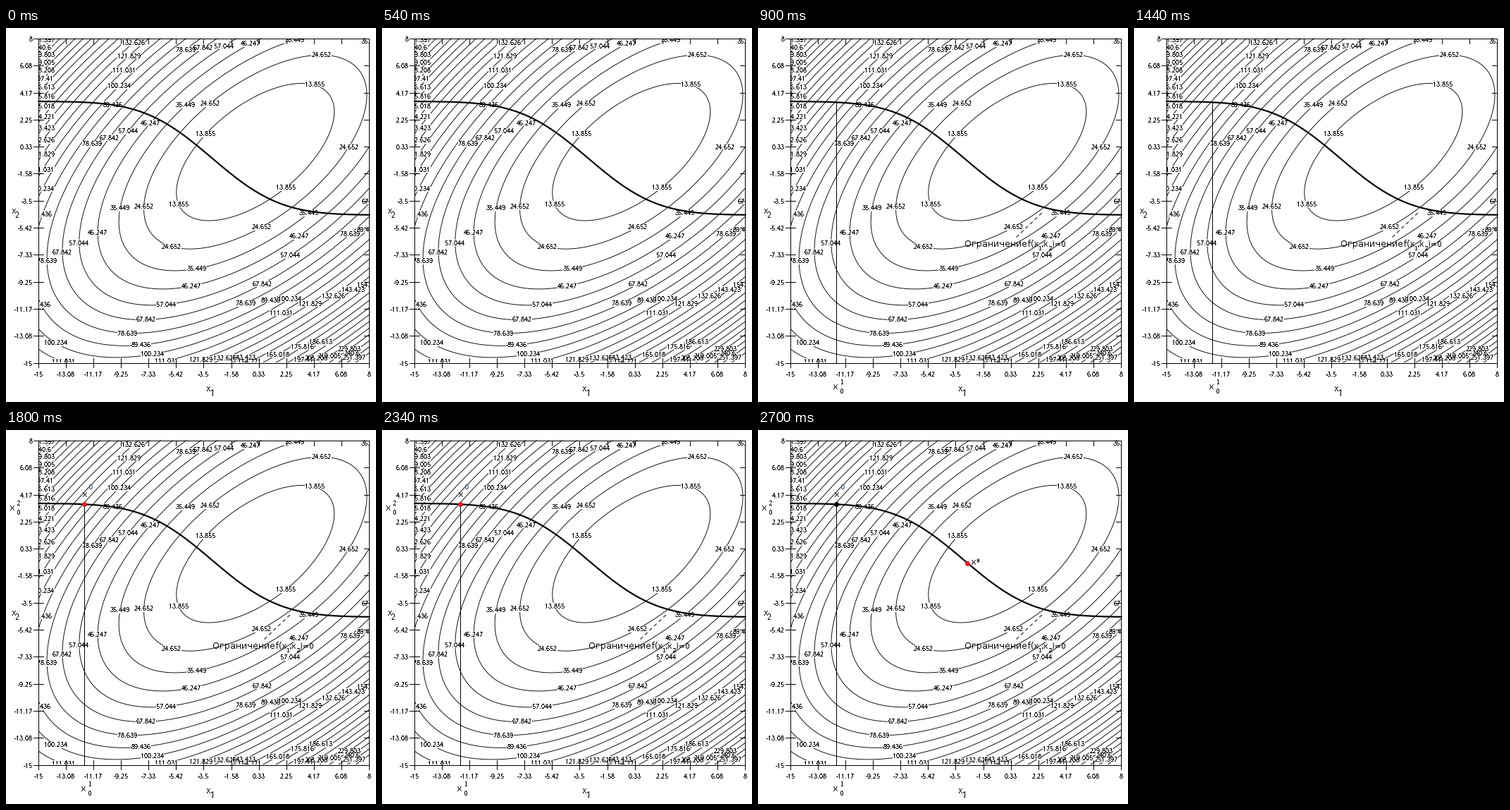
Recreate the animation shown at these times as a matplotlib script. Size 525x530 px, loop 3600 ms.

```python
import numpy as np
import matplotlib
import matplotlib.pyplot as plt
from matplotlib.animation import FuncAnimation
from matplotlib.patches import Rectangle

matplotlib.rcParams["text.hinting"] = "default"
matplotlib.rcParams["text.hinting_factor"] = 1

W, H, DPI = 525, 530, 100
PX = 72 / DPI
LEFT, RIGHT, TOP, BOTTOM = 46, 515, 14, 473.5
LOW, HIGH = -15, 8
X_SCALE = (RIGHT - LEFT) / (HIGH - LOW)
Y_SCALE = (BOTTOM - TOP) / (HIGH - LOW)
BASE, STEP, LEVELS = 3.0572, 10.7974, 24
RED = "#ed1c24"

# Contour labels sit where the levels cross these guide lines
GUIDES = [
    [(246, 249), (161, 255), (129, 290), (57, 330), (49, 395), (81, 472)],
    [(200, 279), (270, 341), (264, 364), (172, 432), (219, 472), (337, 466),
     (345, 473), (382, 463), (448, 443), (420, 470), (455, 466), (486, 454),
     (494, 466)],
    [(400, 221), (355, 284), (430, 259), (404, 321), (336, 390), (403, 382),
     (385, 405), (514, 363)],
    [(283, 150), (289, 106), (254, 109), (205, 134), (122, 164), (152, 106),
     (180, 20)],
    [(438, 79), (447, 37), (408, 16), (255, 30)],
    [(486, 168), (517, 17)],
    [(518, 245), (485, 292), (511, 285)],
    [(51, 263), (53, 16)],
]


def objective(px, py):
    """Quadratic bowl, evaluated at stage pixels."""
    u = LOW + (px - LEFT) / X_SCALE - 0.07
    v = HIGH - (py - TOP) / Y_SCALE + 0.07
    return 0.55 * u * u - 0.73 * u * v + 0.70 * v * v + 3


def constraint_y(px):
    """Smooth fall between two flat ends."""
    d = px - 292
    return 184 + 80.5 * np.tanh(0.0105 * d + 8.6e-8 * d**3)


def short(value, digits):
    return f"{value:.{digits}f}".rstrip("0").rstrip(".")


def crossings(guide):
    """Yield (level value, x, y) along a guide that climbs the bowl."""
    xs, ys = np.array(guide, float).T
    knots = np.arange(len(xs))
    t = np.linspace(0, knots[-1], 60 * len(xs))
    gx, gy = np.interp(t, knots, xs), np.interp(t, knots, ys)
    heights = np.maximum.accumulate(objective(gx, gy))
    first, last = np.rint((heights[[0, -1]] - BASE) / STEP).astype(int)
    for n in range(first, last + 1):
        value = BASE + n * STEP
        at = np.interp(value, heights, t)
        yield value, np.interp(at, knots, xs), np.interp(at, knots, ys)


fig = plt.figure(figsize=(W / DPI, H / DPI), dpi=DPI, facecolor="white")
ax = fig.add_axes([0, 0, 1, 1])
# Just under half a pixel, so whole numbers snap to their own pixel
ax.set_xlim(-0.49, W - 0.49)
ax.set_ylim(H - 0.51, -0.51)
ax.axis("off")
plot_area = Rectangle((LEFT, BOTTOM), RIGHT - LEFT, TOP - BOTTOM,
                      transform=ax.transData)


def line(xs, ys, width=1, z=5, **kw):
    return ax.plot(xs, ys, color="black", lw=width * PX, zorder=z, **kw)[0]


def serif(x, y, s, size=10, ha="center", **kw):
    return ax.text(x, y, s, family="Liberation Serif", fontsize=size * PX,
                   ha=ha, va="baseline", zorder=3, antialiased=False, **kw)


def sans(x, y, s, size=12, color="black"):
    return ax.text(x, y, s, family="DejaVu Sans", fontsize=size * PX,
                   ha="left", va="baseline", color=color, zorder=7)


def dot(x, y):
    return ax.plot([x], [y], "o", ms=7 * PX, mfc=RED, mew=0, zorder=8)[0]


def contour_label(value, x, y):
    s = short(value, 3)
    w = 5 * (len(s) - 1) + 3.5
    gap = Rectangle((x - w / 2, y - 4.5), w, 9, fc="white", ec="none", zorder=2)
    ax.add_patch(gap)
    text = serif(x, y + 3, s, clip_on=True)
    for part in (gap, text):
        part.set_clip_path(plot_area)


def draw_axes():
    line([LEFT, LEFT, RIGHT, RIGHT, LEFT], [TOP, 474, 474, TOP, TOP])
    for part in np.linspace(0, 1, 13):
        x = round(LEFT + part * (RIGHT - LEFT))
        y = round(TOP + part * (BOTTOM - TOP))
        span = part * (HIGH - LOW)
        for ends in ((39, 53), (508, RIGHT)):
            line(ends, [y, y])
        for ends in ((TOP, 21), (467, 480)):
            line([x, x], ends)
        serif(37.5, y + 4, short(HIGH - span, 2), ha="right")
        serif(x - 0.5, 493, short(LOW + span, 2))
    for x, y, index in ((287, 514, "1"), (11, 262, "2")):
        serif(x, y, "x", 14)
        serif(x + 5, y + 6, index, 12)


def draw_plot():
    gx, gy = np.meshgrid(np.linspace(LEFT, RIGHT, 160),
                         np.linspace(TOP, BOTTOM, 160))
    ax.contour(gx, gy, objective(gx, gy),
               BASE + STEP * np.arange(1, LEVELS + 1),
               colors="black", linewidths=0.9 * PX, zorder=1)
    for guide in GUIDES:
        for label in crossings(guide):
            contour_label(*label)
    xs = np.linspace(LEFT, RIGHT, 150)
    line(xs, constraint_y(xs), width=2.2, z=4)


def indexed(x, y, sup):
    return [sans(x, y, "x"), sans(x + 9, y - 7, sup, 9),
            sans(x + 9, y + 6, "0", 9)]


draw_axes()
draw_plot()

constraint = [
    line([111, 111], [104, 474]),
    line([366, 405], [296, 259], dashes=(5, 4)),
    sans(293, 309, "Ограничение", 12.6),
    sans(383, 309, "f(x"),
    sans(397.5, 314, "1", 8.5),
    sans(401.5, 309, ","),
    sans(404.5, 309, "x"),
    sans(411.5, 314, "2", 8.5),
    sans(417, 309, ")=0", 11),
    *indexed(107, 511, "1"),
]
start_dot = dot(111, 104)
start = [start_dot, sans(109, 94, "x"), sans(117, 83, "0", 10, "#1f4e79"),
         *indexed(6, 113, "2")]
optimum = [dot(297, 188.5), sans(303, 190, "x*")]
stages = [constraint, start, optimum]


def update(frame):
    for i, parts in enumerate(stages):
        for part in parts:
            part.set_visible(frame > i)
    start_dot.set_markerfacecolor("black" if frame == 3 else RED)
    return []


anim = FuncAnimation(fig, update, frames=4, interval=900, repeat=True,
                     repeat_delay=0, blit=False)
plt.show()
```
